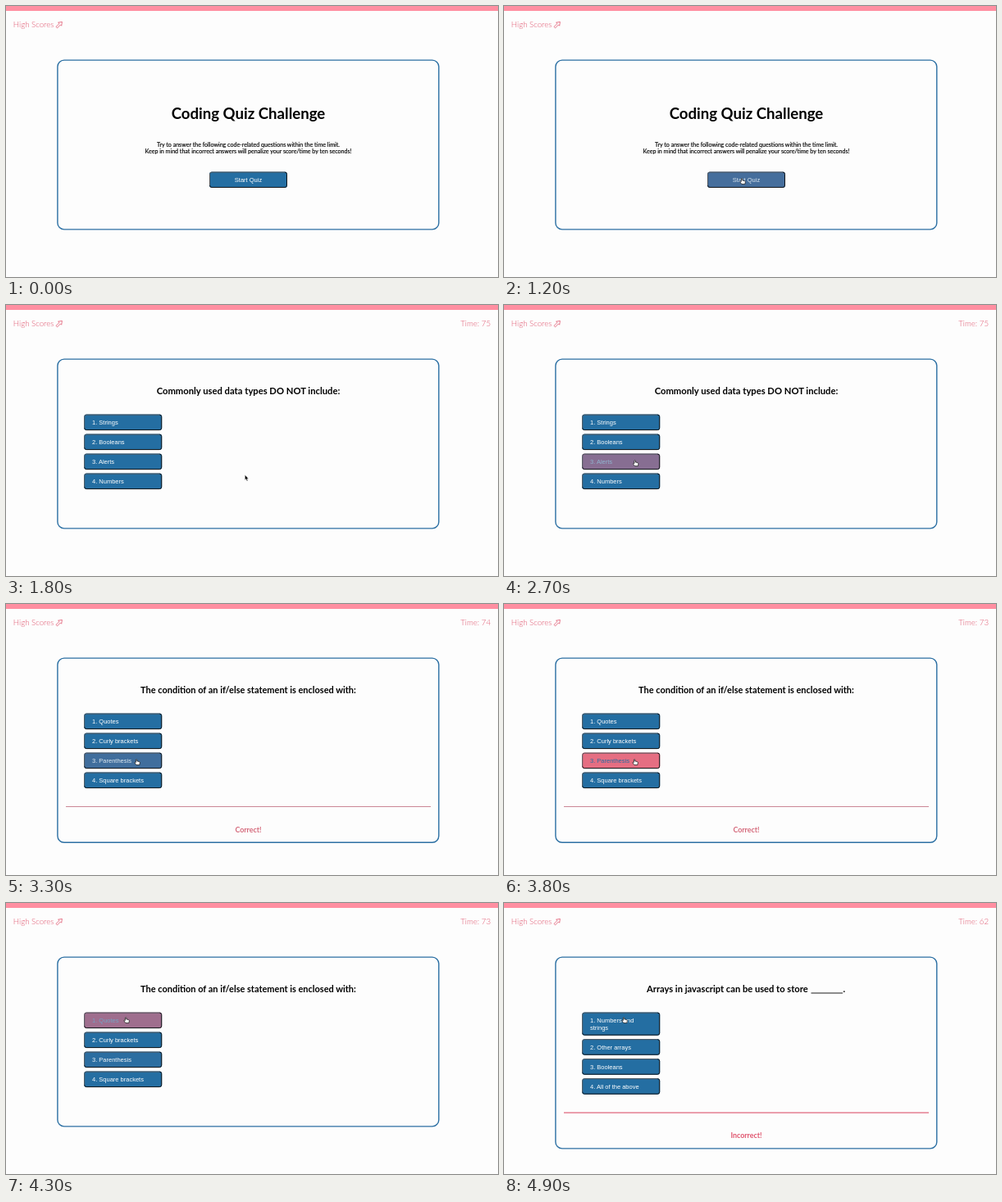
These frames come from a looping animation (600x331 px, 5000 ms). An HTML page:

```html
<!DOCTYPE html>
<html lang="en">
<head>
<meta charset="utf-8">
<title>Coding Quiz Challenge</title>
<style>
  html, body { margin: 0; width: 100%; height: 100%; overflow: hidden; background: #fdfdfd; }
  svg { display: block; width: 100vw; height: 100vh; font-family: Lato, sans-serif; }
  .nav { font-size: 9.7px; font-weight: 300; fill: #e0566f; }
  .title { font-size: 18.6px; font-weight: 700; }
  .intro { font-size: 7.08px; stroke: #000; stroke-width: .15px; }
  .ask { font-weight: 700; }
  .btn { font: 7.5px "Liberation Sans", Arial, sans-serif; }
  .note { font-size: 8.9px; font-weight: 700; }
  .mid { text-anchor: middle; }
  .end { text-anchor: end; }
</style>
</head>
<body>
<svg id="stage" viewBox="0 0 600 331" preserveAspectRatio="none"></svg>
<script>
const stage = document.getElementById('stage');
const LOOP = 5000, STEP = 100, FADE = 500;
const BLUE = [36, 110, 162], PINK = [229, 110, 130], WHITE = [255, 255, 255];

const questions = [
  { from: 1800, size: 11.24, ask: 'Commonly used data types DO NOT include:',
    answers: ['Strings', 'Booleans', 'Alerts', 'Numbers'] },
  { from: 3300, size: 10.98, ask: 'The condition of an if/else statement is enclosed with:',
    answers: ['Quotes', 'Curly brackets', 'Parenthesis', 'Square brackets'],
    note: 'Correct!', until: 4300, ink: '#d56a7c', rule: '#cb8795' },
  { from: 4900, size: 11.17, ask: 'Arrays in javascript can be used to store', blank: true,
    answers: ['Numbers and|strings', 'Other arrays', 'Booleans', 'All of the above'],
    note: 'Incorrect!', until: LOOP, ink: '#e0566f', rule: '#e0667c' }
];

// Hover spans: question index (-1 is the start page), button, enter, leave
const hovers = [
  [-1, 0, 1128, LOOP], [0, 2, 2550, LOOP], [1, 2, 3235, 3930], [1, 0, 4115, LOOP]
];
// Pointer moves: start, end, from x, y, to x, y
const moves = [
  [780, 1180, 296, 318, 291, 214],
  [2200, 2720, 292, 211, 160, 193],
  [3820, 4240, 160, 193, 147, 143]
];
const ticks = [[4900, 62], [3800, 73], [2800, 74], [1800, 75]];

const clamp = v => Math.min(1, Math.max(0, v));
const smooth = v => v * v * (3 - 2 * v);
const mix = (a, b, k) => `rgb(${a.map((v, i) => Math.round(v + (b[i] - v) * k))})`;
const text = (cls, x, y, str, extra = '') => `<text class="${cls}" x="${x}" y="${y}" ${extra}>${str}</text>`;

// CSS "ease": cubic-bezier(.25, .1, .25, 1)
function ease(x) {
  let lo = 0, hi = 1, s = x;
  for (let i = 0; i < 24; i++) {
    s = (lo + hi) / 2;
    const bx = .75 * s * (1 - s) + s ** 3;
    if (bx < x) lo = s; else hi = s;
  }
  return .3 * s * (1 - s) ** 2 + 3 * s * s * (1 - s) + s ** 3;
}

function heat(page, index, t) {
  const h = hovers.find(v => v[0] === page && v[1] === index);
  if (!h) return 0;
  return ease(clamp((t - h[2]) / FADE)) * (1 - ease(clamp((t - h[3]) / FADE)));
}

function button(x, y, h, label, k, centred) {
  const r = x + 94, b = y + h - 1;
  const lines = label.split('|').map((line, i) =>
    text(centred ? 'btn mid' : 'btn', centred ? x + 47.5 : x + 9.8, y + 12.3 + i * 8.8, line,
      `fill="${mix(WHITE, BLUE, k)}"`)).join('');
  return `<rect x="${x}" y="${y}" width="95" height="${h}" rx="3" fill="${mix(BLUE, PINK, k)}"/>
    <g fill="none" stroke-width="1">
      <path d="M${x + .5} ${b - 2}V${y + 3}q0-2.5 2.5-2.5H${r - 2}" stroke="#4c5258"/>
      <path d="M${r - 2} ${y + .5}q2.5 0 2.5 2.5V${b - 2}q0 2.5-2.5 2.5H${x + 3}q-2.5 0-2.5-2.5" stroke="#101418"/>
    </g>${lines}`;
}

const card = bottom => `<rect x="62.9" y="66.1" width="464.9" height="${bottom - 66.1}" rx="8"
  fill="none" stroke="#2b6fa3" stroke-width="1.4"/>`;

const header = `<rect width="600" height="331" fill="#fdfdfd"/>
  <rect width="600" height="6" fill="#ff8fa1"/>
  ${text('nav', 8.8, 26.2, 'High Scores')}
  <path d="M68.4 19.4L63.6 20.2L65 21.4L61 25.4L62.6 26.9L66.4 22.9L67.7 24.2Z"
    fill="none" stroke="#e0566f" stroke-width=".8"/>`;

function startPage(t) {
  return card(272.9) + text('title mid', 295.5, 138, 'Coding Quiz Challenge') +
    text('intro mid', 295.5, 171.7, 'Try to answer the following code-related questions within the time limit.') +
    text('intro mid', 295.5, 180, 'Keep in mind that incorrect answers will penalize your score/time by ten seconds!') +
    button(248, 202.5, 19.5, 'Start Quiz', heat(-1, 0, t), true);
}

function quizPage(q, page, t) {
  const size = `style="font-size:${q.size}px"`;
  let out = q.blank
    ? text('ask', 174, 108.6, q.ask, size) + text('ask', 413.4, 108.6, '.', size) +
      '<path d="M374.5 110H413" stroke="#000" stroke-width=".9"/>'
    : text('ask mid', 295.5, 108.6, q.ask, size);
  let y = 133.6;
  q.answers.forEach((a, i) => {
    const h = a.includes('|') ? 28.1 : 19.5;
    out += button(95.2, y, h, `${i + 1}. ${a}`, heat(page, i, t));
    y += h + 4.5;
  });
  const open = q.note && t < q.until;
  if (open) {
    out += `<path d="M73 ${y + 17.9}H518" stroke="${q.rule}" stroke-width="1.2"/>` +
      text('note mid', 295.5, y + 49.2, q.note, `fill="${q.ink}"`);
  }
  const time = ticks.find(v => t >= v[0])[1];
  return card(open ? y + 61.7 : 272.9) + out + text('nav end', 591, 26.2, `Time: ${time}`);
}

function pointer(t) {
  if (t < 800) return '';
  const [a, b, x0, y0, x1, y1] = moves.filter(m => t >= m[0]).pop();
  const k = smooth(clamp((t - a) / (b - a)));
  let x = x0 + (x1 - x0) * k, y = y0 + (y1 - y0) * k;
  if (t >= 1800 && t < 2200) { x = 292; y = 211; }
  const hand = (t >= 1128 && t < 1800) || (t >= 2550 && t < 3930) || t >= 4115;
  const shape = hand
    ? `<path d="M-1.6 .4V-3q.7-1 1.4 0v2l2.6.5q1 .3.9 1.4L2.8 3.6H-1.1L-3.2.8q.3-1.1 1.6-.4Z"
        fill="#fff" stroke="#111" stroke-width=".7"/>`
    : `<path d="M-.6-3.5V2.8L.8 1.6l1 2.3 1.1-.5-1-2.2H3.7Z" fill="#000" stroke="#fff" stroke-width=".4"/>`;
  return `<g transform="translate(${x} ${y})">${shape}</g>`;
}

function draw(t) {
  const page = questions.filter(q => t >= q.from).length - 1;
  stage.innerHTML = header + (page < 0 ? startPage(t) : quizPage(questions[page], page, t)) + pointer(t);
}

let shown = -1;
const begin = performance.now();
function loop() {
  const t = Math.floor((performance.now() - begin) % LOOP / STEP) * STEP;
  if (t !== shown) draw(shown = t);
  requestAnimationFrame(loop);
}
loop();
</script>
</body>
</html>
```
